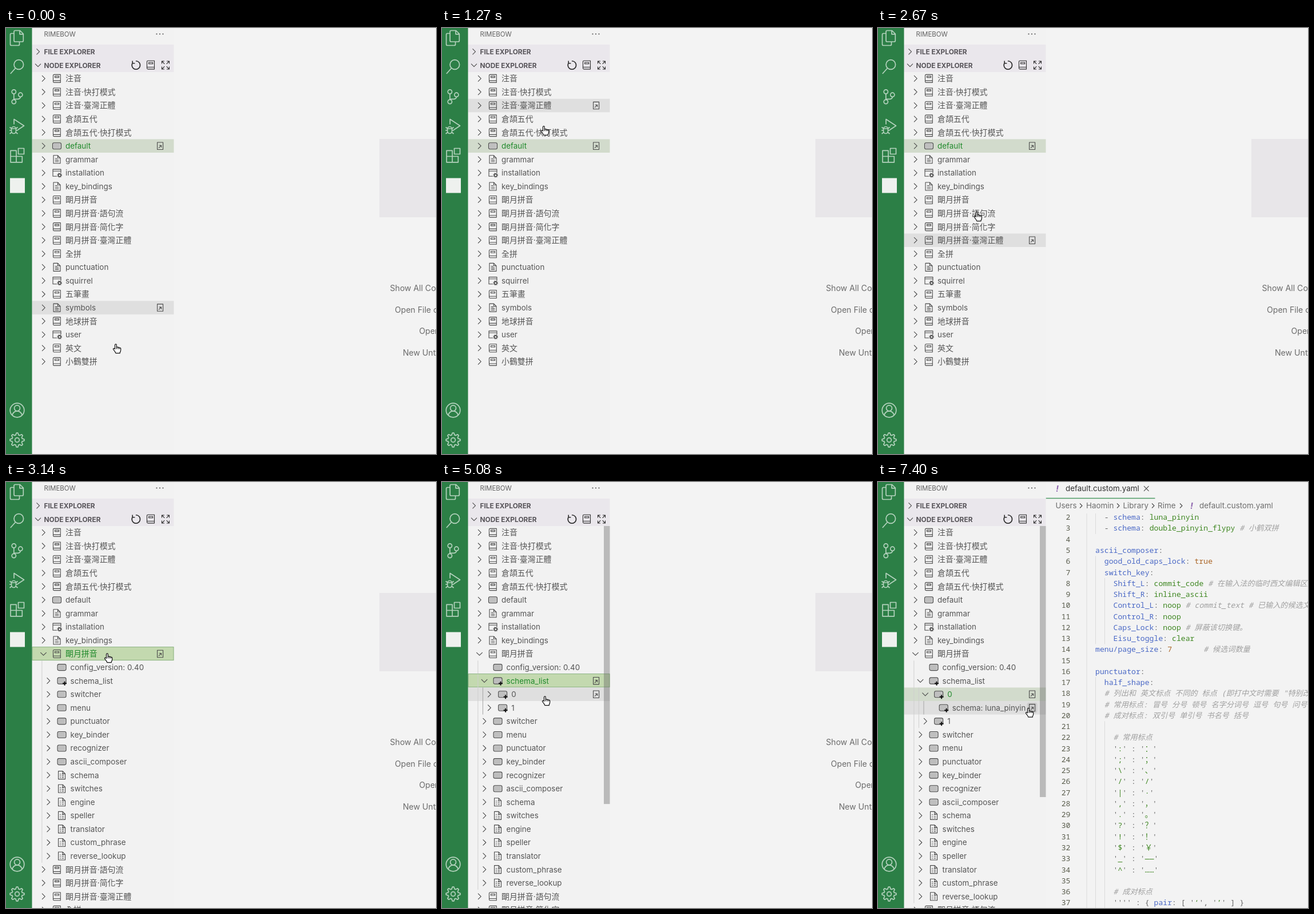
Recreate the animation shown at these times as an HTML page. Size 752x745 px, loop 8 s.

```html
<!DOCTYPE html>
<html lang="zh-Hant">
<head>
<meta charset="utf-8">
<title>Node explorer</title>
<style>
html, body { margin: 0; width: 100%; height: 100%; overflow: hidden; background: #f3f3f3; }
svg { display: block; width: 752px; height: 745px; }
text { font: 13.45px Inter, "Noto Sans CJK TC", sans-serif; fill: #555; white-space: pre; }
text.cjk { font-size: 13.93px; }
text.on { fill: #218a2c; }
.head { font-size: 11.5px; fill: #616161; }
.section { font-size: 11.9px; font-weight: 700; fill: #575459; }
.hint text { font-size: 14.1px; fill: #6b6b6b; }
.crumbs text { fill: #6d6d6d; }
.crumbs .tab { fill: #333; }
.crumbs .mark { font-size: 15px; font-weight: 700; font-style: italic; fill: #9068b0; }
.line { stroke: #4a4a4a; stroke-width: 1.1; fill: none; stroke-linejoin: round; }
.bar { stroke: #b4d2bd; stroke-width: 1.7; fill: none; stroke-linejoin: round; }
.guide { stroke: #cfcfcf; }
.guide.deep { stroke: #a5a5a5; }
.code text { font: 500 13.15px "Noto Sans Mono", "Noto Sans CJK SC", "DejaVu Sans Mono", monospace; fill: #666; }
.code .num { fill: #595c4c; text-anchor: end; }
.code .key { fill: #4b69c6; }
.code .str { fill: #3f8722; }
.code .const { fill: #ab6526; }
.code .note { fill: #a0a0a0; font-style: italic; font-weight: 400; }
</style>
</head>
<body>
<svg viewBox="0 0 752 745" xmlns="http://www.w3.org/2000/svg">
  <rect width="752" height="745" fill="#f3f3f3"/>

  <g class="hint" id="welcome">
    <rect x="653" y="194" width="137" height="137" fill="#e8e6e9"/>
    <text x="671.5" y="460">Show All Commands</text>
    <text x="680" y="497.5">Open File or Folder</text>
    <text x="722.5" y="535">Open Recent</text>
    <text x="694" y="572.5">New Untitled Text File</text>
  </g>

  <g id="editor" display="none">
    <path d="M293 28.5H484.5" stroke="#4d9a64" stroke-width="1.3"/>
    <g class="crumbs">
      <text class="mark" x="311" y="16.5">!</text>
      <text class="tab" x="328" y="15.8">default.custom.yaml</text>
      <path class="line" d="M465 7.2l8.6 8.6m0-8.6l-8.6 8.6"/>
      <text x="310.5" y="46">Users</text>
      <text x="364" y="46">Haomin</text>
      <text x="428.5" y="46">Library</text>
      <text x="489" y="46">Rime</text>
      <text class="mark" x="546" y="46.5">!</text>
      <text x="562" y="46">default.custom.yaml</text>
      <path class="line" d="M353 37.5l4 4-4 4M418 37.5l4 4-4 4M479 37.5l4 4-4 4M528 37.5l4 4-4 4"/>
    </g>
    <g class="code" id="code" lang="zh-Hans"></g>
  </g>

  <rect x="45" width="248.5" height="745" fill="#f2f2f2"/>
  <g id="tree"></g>
  <rect id="thumb" x="283" y="77" width="10.5" fill="rgb(100,100,100)" fill-opacity=".4"/>

  <rect x="45" width="248.5" height="29" fill="#f2f2f2"/>
  <rect x="45" y="29" width="248.5" height="48" fill="#eae7ec"/>
  <text class="head" x="66.5" y="15">RIMEBOW</text>
  <g fill="#555"><circle cx="263.5" cy="10.5" r="1.1"/><circle cx="269" cy="10.5" r="1.1"/><circle cx="274.5" cy="10.5" r="1.1"/></g>
  <text class="section" x="66.5" y="45.5">FILE EXPLORER</text>
  <text class="section" x="66.5" y="69.5">NODE EXPLORER</text>
  <path class="line" d="M53.5 36.3l5 5-5 5M51 62.7l5 5 5-5"/>
  <g class="line" style="stroke:#2c2c2c">
    <path d="M222 60.2a7.2 7.2 0 1 0 5-2.4M221.2 57.5v4.2h4.2" stroke-width="1.6"/>
    <path d="M249 57.3h10.5v14.6h-11.2a1.8 1.8 0 0 1-1.8-1.8v-11a1.8 1.8 0 0 1 1.8-1.8zM247 68.5h12.5M249.7 60.2h7v2.6h-7z"/>
    <path d="M272.5 62.5v-4.5h4.5M281 58h4.5v4.5M285.5 67.5v4.5h-4.5M277 72h-4.5v-4.5M272.5 58l4.8 4.8M285.5 58l-4.8 4.8M285.5 72l-4.8-4.8M272.5 72l4.8-4.8"/>
  </g>

  <rect width="45.5" height="745" fill="#2c7f46"/>
  <g class="bar">
    <path d="M14 9.5v-3a2 2 0 0 1 2-2h8.5l5.8 5.8V22a2 2 0 0 1-2 2H16a2 2 0 0 1-2-2zM24 4.8v6h6M14 9.5h-4.5a2 2 0 0 0-2 2V28.5a2 2 0 0 0 2 2H21.5a2 2 0 0 0 2-2V24"/>
    <circle cx="22.3" cy="64" r="8.3"/><path d="M16.5 70.2L7.8 80"/>
    <circle cx="13.8" cy="111.5" r="3.6"/><circle cx="25.3" cy="116.8" r="3.6"/><circle cx="13.8" cy="129" r="3.6"/>
    <path d="M13.8 115.1v10.3M25.3 120.4q-.6 4-5 4H13.8"/>
    <path d="M14 168.5V159.5L31.5 171 20.5 178.3"/>
    <path d="M9.5 177a4 4.5 0 0 1 8 0v3a4 4.5 0 0 1-8 0zM9.5 176h8M6.5 173.5l3 2.2M20.5 173.5l-3 2.2M6 179h3.5M17.5 179h3.5M6.5 185l3.3-2.5M20.5 185l-3.3-2.5"/>
    <path d="M8 214.3h10v20.5h-10zM8 224.5h20.3v10.3H18M21.5 210.5h10v10h-10z"/>
    <circle cx="19.5" cy="668.5" r="12.3"/><circle cx="19.5" cy="664.8" r="5"/><path d="M11 677.2a8.6 8.6 0 0 1 17 0"/>
    <path id="cog"/><circle cx="19.5" cy="720.5" r="3.8"/>
  </g>
  <rect x="7" y="262.5" width="26" height="26" fill="#eef1ee"/>

  <path id="hand" fill="#fff" stroke="#111" stroke-width="1.2" stroke-linejoin="round"
    d="M-3.5 1.5V-5.7a1.4 1.4 0 0 1 2.8 0V-1.8q2.2-.9 2.8.5q1.9-.7 2.4.7q2.2-.4 2.2 1.6V3q0 2.5-1.4 4.2V8.7H-2Q-3 6-6 2.6q-1.2-1.8.4-2.3q1.1-.2 2.1 1.2zM-.7-1.8V1.5M2.1-1.3V1.5M4.5-.6V1.6"/>
</svg>
<script>
const $ = id => document.getElementById(id);
const TOP = 76.6, ROW = 23.57, INDENT = 8.57, LOOP = 8000;

// Icon shapes, centred on the origin
const action = '<path d="M-5-6.2H5V6.2H-5zM-2.6 3.6L1.7-.7M-1.8-1H2V2.8"/>';
const slab = '<rect x="-7.5" y="-5.5" width="15" height="11" rx="2.5" fill="#c6c6c6"/><path d="M-5-2.5H5M-5 0H5M-5 2.5H5" stroke="#a2a2a2" stroke-dasharray="1 1"/>';
const page = '<path d="M-6-7H1.5L6-2.5V7H-6zM1.5-7V-2.5H6"/>';
const icons = {
  book: '<path d="M-4.5-7H6.3V7H-4.8A1.7 1.7 0 0 1-6.5 5.3V-5.3A1.7 1.7 0 0 1-4.5-7zM-6.3 3.7H6.3M-3.5-4.3H3.5V-1.8H-3.5z"/>',
  doc: page + '<path d="M-3.3-1.5H1M-3.3 1.3H3.3M-3.3 4H3.3"/>',
  list: page + '<path d="M-3.6-1.8H-1.8M0-1.8H3.6M-3.6 1.2H-1.8M0 1.2H3.6M-3.6 4.2H-1.8M0 4.2H3.6"/>',
  conf: '<path d="M0 5.8H-7V-6.3H7V0M-7-3.2H7"/><circle cx="4.7" cy="4" r="2.3" stroke-width="1.6"/><circle cx="4.7" cy="4" r="3.7" stroke-dasharray="1.4 1.5"/>',
  slab,
  plus: slab + '<path d="M5 1V8M1.5 4.5H8.5" stroke="#111" stroke-width="2"/>'
};

const node = (icon, depth = 0, leaf = false) => name => ({ icon, depth, leaf, name });
const many = (icon, names, depth) => names.split(' ').map(node(icon, depth));
const base = [
  ...many('book', '注音 注音·快打模式 注音·臺灣正體 倉頡五代 倉頡五代·快打模式'),
  ...many('slab', 'default'), ...many('doc', 'grammar'), ...many('conf', 'installation'),
  ...many('doc', 'key_bindings'),
  ...many('book', '朙月拼音 朙月拼音·語句流 朙月拼音·简化字 朙月拼音·臺灣正體 全拼'),
  ...many('doc', 'punctuation'), ...many('conf', 'squirrel'), ...many('book', '五筆畫'),
  ...many('doc', 'symbols'), ...many('book', '地球拼音'), ...many('conf', 'user'),
  ...many('book', '英文 小鶴雙拼')
];
const luna = [
  node('slab', 1, true)('config_version: 0.40'), ...many('plus', 'schema_list', 1),
  ...many('slab', 'switcher menu punctuator key_binder recognizer ascii_composer', 1),
  ...many('list', 'schema switches engine speller translator custom_phrase reverse_lookup', 1)
];
const insert = (rows, at, extra) => [...rows.slice(0, at), ...extra, ...rows.slice(at)];
const trees = [base];
trees[1] = insert(base, 10, luna);
trees[2] = insert(trees[1], 12, many('plus', '0 1', 2));
trees[3] = insert(trees[2], 13, [node('plus', 3, true)('schema: luna_pinyin')]);
const selected = [5, 9, 11, 12];

function drawTree(stage, hover, focus, overAction) {
  const rows = trees[stage], pick = selected[stage];
  let out = '';
  rows.forEach((r, i) => {
    const top = TOP + i * ROW, mid = top + ROW / 2, dx = r.depth * INDENT;
    const on = i === pick, lit = on || i === hover;
    if (lit) {
      const fill = on ? (focus ? '#c3d9af' : '#d2dbcc') : '#dfdfdf';
      out += `<rect x="45.5" y="${top}" width="248" height="${ROW}" fill="${fill}"/>`;
      if (on && focus) out += `<rect x="46" y="${Math.floor(top) + .5}" width="247" height="23" fill="none" stroke="#8fb586"/>`;
    }
    for (let d = 1; d <= r.depth; d++) {
      const x = 54.3 + d * INDENT;
      out += `<path class="guide ${d > 1 && d === stage ? 'deep' : ''}" d="M${x} ${top}v${ROW}"/>`;
    }
    if (!r.leaf) {
      const open = rows[i + 1] && rows[i + 1].depth > r.depth;
      out += `<path class="line" d="M-2.5-5.2L2.7 0-2.5 5.2" transform="translate(${65.5 + dx} ${mid})${open ? 'rotate(90)' : ''}"/>`;
    }
    out += `<g class="line" transform="translate(${89 + dx} ${mid})">${icons[r.icon]}</g>`;
    const cls = (r.name.charCodeAt(0) > 255 ? 'cjk ' : '') + (on ? 'on' : '');
    out += `<text class="${cls}" x="${104 + dx}" y="${mid + 4.9}">${r.name}</text>`;
    if (lit) {
      if (overAction && i === hover) out += `<rect x="260.5" y="${mid - 9}" width="18" height="18" rx="4" fill="#cdcdcd"/>`;
      out += `<g class="line" transform="translate(269.6 ${mid})">${action}</g>`;
    }
  });
  $('tree').innerHTML = out;
}

const yaml = String.raw`  - schema: luna_pinyin
  - schema: double_pinyin_flypy # 小鹤双拼

ascii_composer:
  good_old_caps_lock: true
  switch_key:
    Shift_L: commit_code # 在输入法的临时西文编辑区内输入字母
    Shift_R: inline_ascii
    Control_L: noop # commit_text # 已输入的候选文字
    Control_R: noop
    Caps_Lock: noop # 屏蔽该切换键。
    Eisu_toggle: clear
menu/page_size: 7       # 候选词数量

punctuator:
  half_shape:
  # 列出和 英文标点 不同的 标点 (即打中文时需要 "特别改变"
  # 常用标点: 冒号 分号 顿号 名字分词号 逗号 句号 问号
  # 成对标点: 双引号 单引号 书名号 括号

    # 常用标点
    ':' : '：'
    ';' : '；'
    '\' : '、'
    '/' : '/'
    '|' : '·'
    ',' : '，'
    '.' : '。'
    '?' : '？'
    '!' : '！'
    '$' : '￥'
    '_' : '——'
    '^' : '……'

    # 成对标点
    '''' : { pair: [ '‘', '’' ] }`.split('\n');

function paint(line) {
  const span = (cls, s) => `<tspan class="${cls}">${s}</tspan>`;
  return line.replace(/(#.*)|'([^']*)'|([\w\/]+)(?=:)|\b(true|\d+)\b|(\w+)/g,
    (all, note, quoted, key, value, word) =>
      note ? span('note', note) : key ? span('key', key) : value ? span('const', value) :
      word ? span('str', word) : `'${span('str', quoted)}'`);
}

const lineY = n => 62 + (n - 2) * 19.26;
const ruler = (x, from, to) => `<path d="M${x} ${Math.max(55, lineY(from) - 9.6)}V${lineY(to) + 9.6}" stroke="#dadada"/>`;
$('code').innerHTML = ruler(365, 2, 37) + ruler(380.5, 2, 3) + ruler(380.5, 6, 13) +
  ruler(380.5, 17, 37) + ruler(396.5, 8, 13) + ruler(396.5, 21, 37) +
  yaml.map((s, i) => {
    const y = lineY(i + 2) + 4.2;
    return `<text class="num" x="336.5" y="${y}">${i + 2}</text><text x="380" y="${y}">${paint(s)}</text>`;
  }).join('');

// Eight-toothed cog outline
$('cog').setAttribute('d', 'M' + Array.from({ length: 32 }, (_, i) => {
  const a = (i - .5) * Math.PI / 16, r = i % 4 < 2 ? 12.5 : 9;
  return `${19.5 + r * Math.cos(a)} ${720.5 + r * Math.sin(a)}`;
}).join('L') + 'z');

const smooth = u => u * u * (3 - 2 * u);
const slowing = u => 1 - (1 - u) ** 2;
// start, end, steps, x, y, easing
const moves = [
  [120, 820, 8, 184, 140, slowing],
  [1090, 1890, 9, 152, 447, smooth],
  [2430, 2780, 4, 179, 307, smooth],
  [3710, 4180, 6, 180, 355, smooth],
  [4900, 5080, 3, 182, 382, smooth],
  [5710, 5970, 4, 192, 403, smooth],
  [6330, 6720, 5, 265, 402.5, smooth]
];

// The hover highlight trails the pointer by a quarter of the move until it stops
function pointer(t) {
  let x = 194, y = 560, hover = 17;
  for (const [t0, t1, n, tx, ty, ease] of moves) {
    if (t < t0) break;
    const k = Math.min(n, Math.floor((t - t0) / (t1 - t0) * (n - 1) + 1e-6) + 1);
    const lagY = y + (ty - y) * ease(k === n ? 1 : Math.max(0, k / n - .25));
    const e = ease(k / n);
    x += (tx - x) * e;
    y += (ty - y) * e;
    hover = Math.floor((lagY - 7 - TOP) / ROW);
  }
  return { x, y, hover };
}

const count = (t, times) => times.filter(v => t >= v).length;
let last = '';
function frame() {
  const t = performance.now() % LOOP;
  const { x, y, hover } = pointer(t);
  const stage = count(t, [3140, 4540, 5620]);
  const bar = count(t, [3260, 4630, 5710]);
  const opened = t >= 7400;
  const focus = stage > 0 && !opened, over = x > 260;
  const key = [stage, hover, focus, over].join();
  if (key !== last) drawTree(stage, hover, focus, over);
  last = key;
  $('hand').setAttribute('transform', `translate(${x} ${y})`);
  $('thumb').setAttribute('height', bar ? 18960 / trees[bar].length : 0);
  $('editor').setAttribute('display', opened ? 'inline' : 'none');
  $('welcome').setAttribute('display', opened ? 'none' : 'inline');
  requestAnimationFrame(frame);
}
frame();
</script>
</body>
</html>
```
